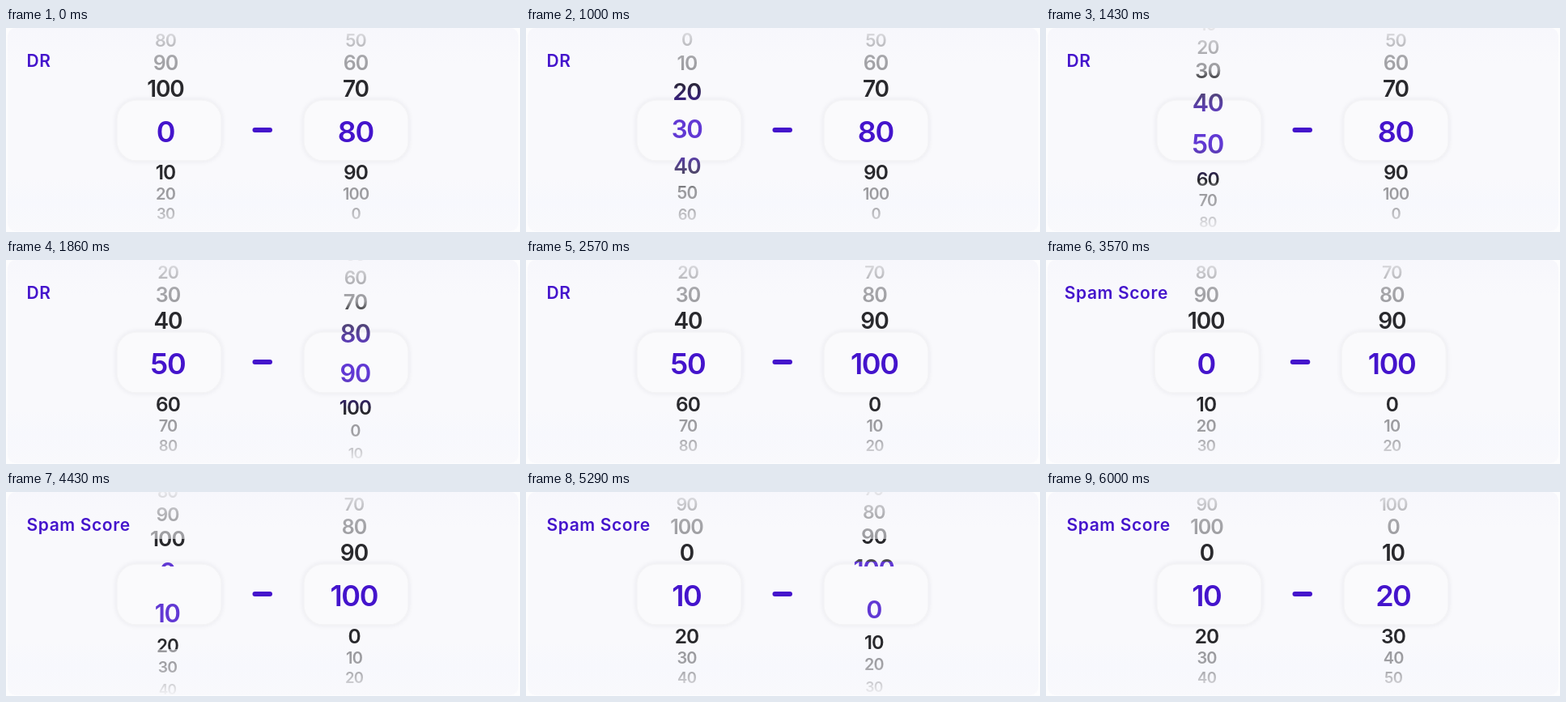
Animation, 635 px wide and 252 px high, one loop 7.71 s. Source, as an HTML page with a canvas:

```html
<!DOCTYPE html>
<html lang="en">
<head>
<meta charset="utf-8">
<title>Range pickers</title>
<style>
html, body { margin: 0; width: 100%; height: 100%; overflow: hidden; background: #fdfdfe; }
canvas { display: block; }
</style>
</head>
<body>
<canvas id="stage" width="635" height="252"></canvas>
<script>
const W = 635, H = 252, LOOP = 7710, FPS = 7;
const PURPLE = '#4414cc', DARK = '#29292d';
const FONT = 'Inter, "Open Sans", sans-serif';
const ctx = document.getElementById('stage').getContext('2d');

// Row centres and font sizes, from four rows above the window to four below
const ROW_Y = [-13, 15, 43, 75, 128, 178, 205, 229, 262];
const ROW_SIZE = [20, 21.5, 25, 28, 36, 24.5, 20, 18.5, 16];

// Times are in steps of 1/7 s; positions count rows of ten
const PANELS = [
  { label: 'DR', clipped: false, wheels: [
    { pos: [0, 5], time: [4, 12], x: [197.5, 200.5] },
    { pos: [8, 10], time: [12.2, 16], x: [432.5, 431] } ] },
  { label: 'Spam Score', clipped: true, wheels: [
    { pos: [0, 1], time: [30, 33], x: [201, 199] },
    { pos: [10, 13], time: [36.34, 42], x: [430.5, 429.5] } ] }
];
const SWAP = 21, SLIDE = [20.5, 26];

const mix = (a, b, p) => a + (b - a) * p;
const progress = (n, [a, b]) => Math.min(1, Math.max(0, (n - a) / (b - a)));
const easeOut = (p, power = 2) => 1 - (1 - p) ** power;

function along(list, offset) {
  const i = Math.min(list.length - 2, Math.max(0, Math.floor(offset + 4)));
  return mix(list[i], list[i + 1], offset + 4 - i);
}

// Row values are averaged over a span while the wheel turns
const smooth = (list, offset, spread) =>
  (along(list, offset - spread) + along(list, offset + spread)) / 2;

function vertical(stops) {
  const g = ctx.createLinearGradient(0, 0, 0, H);
  for (const [y, color] of stops) g.addColorStop(y / H, color);
  return g;
}

// Number colour depends on height; each band edge is a pair of heights
function inkGradient(top, enter, leave, bottom) {
  const edge = ([a, b], from, to) => [[a, from], [b, to]];
  return vertical([
    [0, '#e8e8ec'], [15, '#c8c8cc'], [34, '#a8a8ac'],
    ...edge(top, '#9c9ca0', DARK),
    ...edge(enter, DARK, PURPLE),
    ...edge(leave, PURPLE, DARK),
    ...edge(bottom, DARK, '#98989c'),
    [213, '#a0a0a4'], [224, '#b0b0b4'], [237, '#d0d0d4'], [250, '#f2f2f5']
  ]);
}
const HARD_INK = inkGradient([58, 58], [86, 86], [165, 165], [194, 194]);
const SOFT_INK = inkGradient([51, 65], [65, 112], [145, 188], [190, 198]);
const CARD = vertical([[0, '#f7f7fc'], [45, '#f9f9fc'], [185, '#f9f9fc'], [215, '#f7f8fd'], [252, '#f9f9fc']]);

function roundRect(x, y, w, h, r) {
  ctx.beginPath();
  ctx.roundRect(x, y, w, h, r);
}

function drawWindow(x) {
  ctx.save();
  ctx.shadowColor = 'rgba(40, 40, 70, .10)';
  ctx.shadowBlur = 7;
  roundRect(x, 89, 129, 75, 24);
  ctx.fillStyle = '#fafafc';
  ctx.fill();
  ctx.restore();
  ctx.strokeStyle = '#f4f4f6';
  ctx.lineWidth = 1.5;
  ctx.stroke();
}

function drawText(text, x, y, size, spacing) {
  ctx.font = `600 ${size}px ${FONT}`;
  ctx.letterSpacing = `${spacing}px`;
  ctx.fillText(text, x, y);
}

function drawWheel({ pos, time, x }, n, clipped) {
  const p = easeOut(progress(n, time));
  const at = mix(...pos, p), base = Math.round(at);
  const moving = p > 0 && p < 1;
  const spread = moving ? Math.min(0.5, pos[1] - at) : 0;
  ctx.textAlign = 'center';
  ctx.fillStyle = moving && !clipped ? SOFT_INK : HARD_INK;
  for (let k = -4; k <= 4; k++) {
    const row = base + k, offset = row - at;
    if (Math.abs(offset) > 4) continue;
    const size = smooth(ROW_SIZE, offset, spread);
    const y = smooth(ROW_Y, offset, spread) + size * 0.364;
    const spacing = -size * 0.04;
    ctx.save();
    // A leaving number slips behind the window
    if (clipped && offset > -1 && offset <= -0.5) {
      ctx.beginPath();
      ctx.rect(0, 0, W, 92);
      ctx.clip();
    }
    if (moving && Math.abs(offset) < 1) ctx.globalAlpha = 0.84;
    drawText((row + 11) % 11 * 10, mix(...x, p) + spacing / 2, y, size, spacing);
    ctx.restore();
  }
}

function drawPanel({ label, clipped, wheels }, n) {
  drawWindow(137);
  drawWindow(368);
  ctx.fillStyle = PURPLE;
  roundRect(304.5, 123, 24.5, 6, 3);
  ctx.fill();
  ctx.textAlign = 'left';
  drawText(label, 25.5, 48, 21, 0.6);
  for (const wheel of wheels) drawWheel(wheel, n, clipped);
}

const start = performance.now();

function draw() {
  const t = (performance.now() - start) % LOOP;
  const n = Math.floor((t + 5) * FPS / 1000);
  ctx.fillStyle = '#fdfdfe';
  ctx.fillRect(0, 0, W, H);
  ctx.fillStyle = CARD;
  roundRect(2, 0, 631, 251, 10);
  ctx.fill();
  ctx.save();
  if (n >= SWAP) ctx.translate(-W * (1 - easeOut(progress(n, SLIDE), 3.2)), 0);
  drawPanel(PANELS[n < SWAP ? 0 : 1], n);
  ctx.restore();
  requestAnimationFrame(draw);
}
draw();
</script>
</body>
</html>
```
